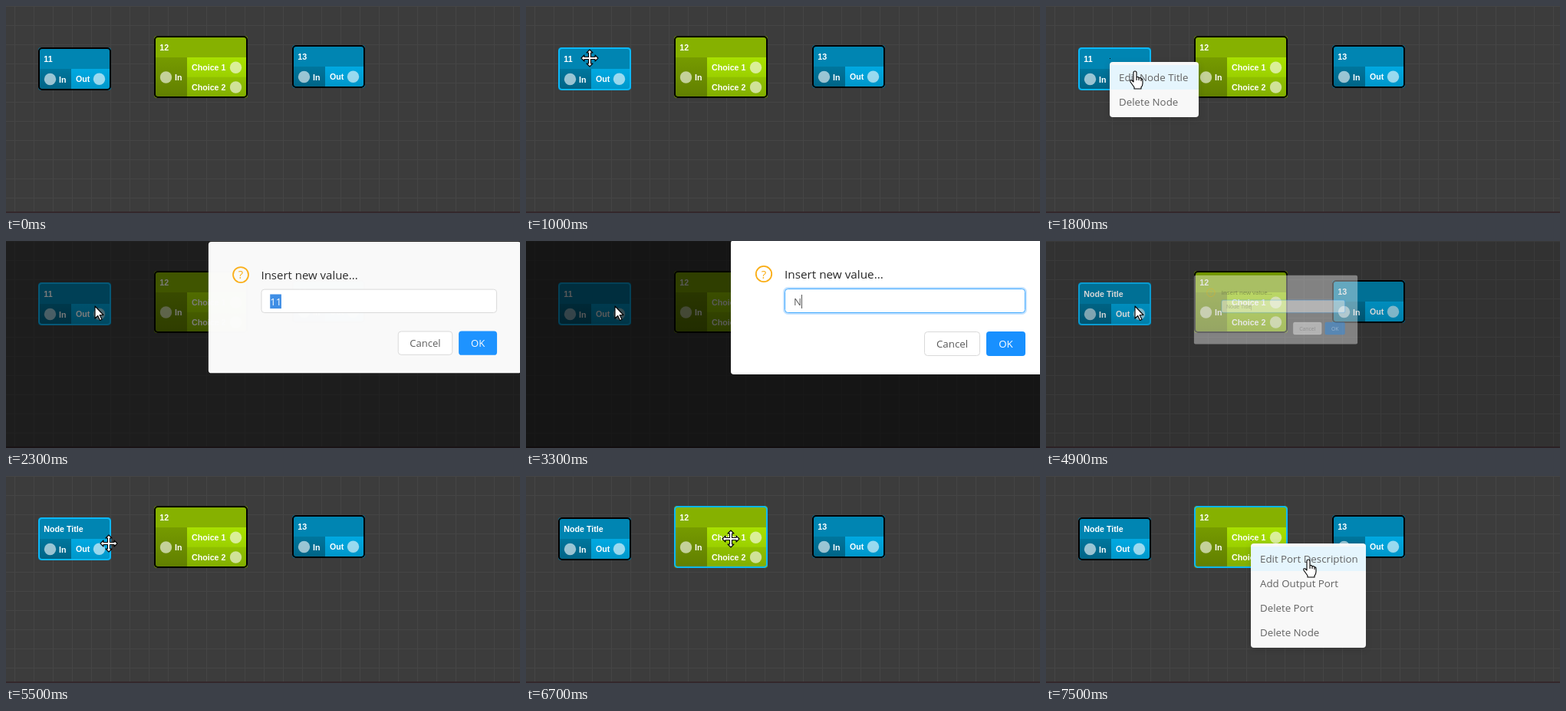
Animation of 670x270 px, one loop 8000 ms. Source, as an HTML page with a canvas:

```html
<!DOCTYPE html>
<html>
<head>
<meta charset="utf-8">
<style>
html, body { margin: 0; width: 100%; height: 100%; overflow: hidden; background: #3c3c3c; }
canvas { display: block; }
</style>
</head>
<body>
<canvas id="stage" width="670" height="270"></canvas>
<script>
const ctx = document.getElementById('stage').getContext('2d');
const LOOP = 8000, STEP = 100;
const NODE_FONT = 'bold 10.67px "Liberation Sans", Arial, sans-serif';
const uiFont = size => `${size}px "Open Sans", sans-serif`;

const BLUE = { head: '#0085b2', in: ['#00769d', '#006486'], out: [['#00a9e2', '#0097ca']] };
const GREEN = { head: '#86b100', in: ['#769b00', '#617f00'], out: [['#a8e000', '#9bd000'], ['#90c000', '#82ae00']] };

// Pointer path: time, x, y
const PATH = [
  [100, 298, 173], [300, 150, 115], [500, 46, 70], [700, 88, 69], [900, 88, 69], [1000, 83, 68],
  [1400, 83, 68], [1800, 116, 85], [5200, 116, 85], [5400, 120, 88], [5500, 134, 88],
  [5600, 165, 80], [5700, 215, 74], [5800, 263, 73], [5900, 263, 73], [6100, 259, 84],
  [6200, 259, 84], [6600, 267, 82], [7100, 267, 82], [7500, 342, 109], [LOOP, 342, 109]
];
const TYPED = [[3300, 1], [3500, 2], [3700, 3], [3800, 4], [3900, 5], [4200, 7], [4400, 8], [4500, 9], [4600, 10]];
const MENUS = [
  { start: 1300, end: 2200, x: 83, y: 73, w: 116, items: ['Edit Node Title', 'Delete Node'] },
  { start: 7100, end: LOOP, x: 267, y: 88, w: 150,
    items: ['Edit Port Description', 'Add Output Port', 'Delete Port', 'Delete Node'] }
];
const CURSORS = {
  arrow: new Path2D('M0 0V16L3.7 12.5L6.5 18.5L9 17.5L6.2 11.5H11Z'),
  move: new Path2D('M0-11L4-7H1.5V-1.5H7V-4L11 0L7 4V1.5H1.5V7H4L0 11L-4 7H-1.5V1.5H-7V4L-11 0L-7-4V-1.5H-1.5V-7H-4Z'),
  hand: new Path2D('M-2 14V2Q-2 0 0 0T2 2V8Q4 6.5 5 9Q7.5 8 8 10Q10 9.5 10 12V16Q10 19 8 21V23H-1V21L-6 14Q-7 11 -4 12ZM2 8V12M5 9V12M8 10V13')
};

const clamp = v => Math.max(0, Math.min(1, v));

function bezier(x1, y1, x2, y2, x) {
  const at = (a, b, u) => 3 * (1 - u) ** 2 * u * a + 3 * (1 - u) * u * u * b + u ** 3;
  let lo = 0, hi = 1;
  for (let i = 0; i < 24; i++) {
    const mid = (lo + hi) / 2;
    if (at(x1, x2, mid) < x) lo = mid; else hi = mid;
  }
  return at(y1, y2, hi);
}

function box(x, y, w, h, r, fill, stroke, line = 1) {
  ctx.beginPath();
  ctx.roundRect(x, y, w, h, r);
  if (fill) { ctx.fillStyle = fill; ctx.fill(); }
  if (stroke) { ctx.strokeStyle = stroke; ctx.lineWidth = line; ctx.stroke(); }
}

function label(str, x, y, font, color, align = 'left') {
  ctx.font = font;
  ctx.fillStyle = color;
  ctx.textAlign = align;
  ctx.fillText(str, x, y);
}

function disc(x, y) {
  ctx.beginPath();
  ctx.arc(x, y, 7.7, 0, 7);
  ctx.fillStyle = 'rgba(255,255,255,.6)';
  ctx.fill();
}

function shade(x, y, w, h, [from, to]) {
  const g = ctx.createLinearGradient(0, y, 0, y + h);
  g.addColorStop(0, from);
  g.addColorStop(1, to);
  ctx.fillStyle = g;
  ctx.fillRect(x, y, w, h);
}

function drawNode(node, selected) {
  const { x, y, w, h, title, ports, theme } = node;
  const top = y + 28, rows = h - 29.5;
  ctx.save();
  box(x, y, w, h, 4, theme.head);
  ctx.clip();
  shade(x, top, 43, rows, theme.in);
  ports.forEach((name, i) => {
    const rowY = top + i * 25.7;
    shade(x + 43, rowY, w - 43, 26, theme.out[i]);
    label(name, x + 49, rowY + 17.2, NODE_FONT, '#fff');
    disc(x + w - 15.5, rowY + 13.3);
  });
  ctx.restore();
  const mid = top + rows / 2;
  disc(x + 15.5, mid + .3);
  label('In', x + 27, mid + 4.4, NODE_FONT, '#fff');
  label(title, x + 7.3, y + 19, NODE_FONT, '#fff');
  box(x + 1, y + 1, w - 2, h - 2, 4, null, selected ? '#0cb8f8' : '#000', 2);
}

function drawMenu({ start, x, y, w, items }, t, px, py) {
  const p = bezier(.23, 1, .32, 1, clamp((t - start + 30) / 200));
  ctx.fillStyle = '#111';
  ctx.fillRect(x, y - 5, 1, 1);
  ctx.save();
  ctx.globalAlpha = p;
  ctx.translate(0, y);
  ctx.scale(1, .8 + .2 * p);
  ctx.shadowColor = 'rgba(0,0,0,.15)';
  ctx.shadowBlur = 8;
  ctx.shadowOffsetY = 2;
  box(x, 0, w, 8 + 32 * items.length, 4, '#f8f8f8');
  ctx.shadowColor = 'transparent';
  items.forEach((item, i) => {
    const rowY = 4 + 32 * i;
    if (px > x && py - y >= rowY && py - y < rowY + 32) {
      ctx.fillStyle = '#e5f5fd';
      ctx.fillRect(x, rowY, w, 32);
    }
    label(item, x + 12, rowY + 21, uiFont(13.3), '#626262');
  });
  ctx.restore();
}

function drawModal(t) {
  const closing = t >= 4750;
  const zoom = closing
    ? 1 - bezier(.78, .14, .15, .86, clamp((t - 4750) / 300))
    : bezier(.08, .82, .17, 1, clamp((t - 2125) / 300));
  const fade = closing ? 1 - clamp((t - 4750) / 200) : clamp((t - 2125) / 220);
  ctx.fillStyle = `rgba(0,0,0,${.65 * fade})`;
  ctx.fillRect(0, 0, 670, 270);

  const scale = .2 + .8 * zoom;
  ctx.save();
  ctx.globalAlpha = zoom;
  ctx.translate(115, 93);
  ctx.scale(scale, scale);
  ctx.translate(-115, -93);
  box(267, -1, 416, 175, 4, '#fff');

  ctx.beginPath();
  ctx.arc(310, 43, 10.2, 0, 7);
  ctx.strokeStyle = '#faad14';
  ctx.lineWidth = 1.8;
  ctx.stroke();
  label('?', 310, 48.5, uiFont(15), '#faad14', 'center');
  label('Insert new value...', 337, 49, uiFont(15.3), '#262626');

  const focused = t >= 2400;
  if (focused) box(336.5, 61.5, 315, 33, 5, null, 'rgba(24,144,255,.25)', 3);
  box(337.5, 62.5, 313, 31, 4, '#fff', focused ? '#40a9ff' : '#d9d9d9');
  const keys = TYPED.filter(k => k[0] <= t).pop();
  if (keys) {
    const text = 'Node Title'.slice(0, keys[1]);
    label(text, 349, 83.5, uiFont(13.3), '#595959');
    ctx.fillRect(349 + Math.round(ctx.measureText(text).width), 70, 1, 18);
  } else {
    ctx.fillStyle = '#3a8be5';
    ctx.fillRect(349, 69, 15, 19);
    label('11', 349, 83.5, uiFont(13.3), '#fff');
  }

  box(519.5, 118.5, 72, 31, 4, '#fff', '#d9d9d9');
  label('Cancel', 555.5, 139, uiFont(13.3), '#595959', 'center');
  box(600, 118, 51, 32, 4, '#1890ff');
  label('OK', 625.5, 139, uiFont(13.3), '#fff', 'center');
  ctx.restore();
}

function pointerAt(t) {
  const i = PATH.findIndex(p => p[0] > t);
  const [t0, x0, y0] = PATH[i - 1], [t1, x1, y1] = PATH[i];
  const k = (t - t0) / (t1 - t0);
  return [x0 + (x1 - x0) * k, y0 + (y1 - y0) * k];
}

function drawCursor(kind, x, y) {
  ctx.save();
  ctx.translate(x, y);
  ctx.lineJoin = 'round';
  ctx.fillStyle = '#fff';
  ctx.strokeStyle = '#000';
  ctx.lineWidth = 1.1;
  ctx.fill(CURSORS[kind]);
  ctx.stroke(CURSORS[kind]);
  ctx.restore();
}

function draw(t) {
  ctx.fillStyle = '#3c3c3c';
  ctx.fillRect(0, 0, 670, 270);
  ctx.fillStyle = '#454545';
  for (let x = 11; x < 670; x += 25) ctx.fillRect(x, 0, 1, 270);
  for (let y = 0; y < 270; y += 25) ctx.fillRect(0, y, 670, 1);
  ctx.fillStyle = '#34282c';
  ctx.fillRect(0, 268, 670, 2);

  const nodes = [
    { x: 42, y: 54, w: 95, h: 56, title: t < 4750 ? '11' : 'Node Title', ports: ['Out'], theme: BLUE },
    { x: 193, y: 39, w: 122, h: 81, title: '12', ports: ['Choice 1', 'Choice 2'], theme: GREEN },
    { x: 373, y: 51, w: 95, h: 56, title: '13', ports: ['Out'], theme: BLUE }
  ];
  const selected = t < 600 ? -1 : t < 6700 ? 0 : 1;
  nodes.forEach((node, i) => drawNode(node, i === selected));

  const modal = t >= 2200 && t < 5000;
  if (modal) drawModal(t);
  if (t < 100) return;

  const [px, py] = pointerAt(t);
  const inside = (r, h) => px >= r.x && px <= r.x + r.w && py >= r.y && py <= r.y + h;
  const menu = MENUS.find(m => t >= m.start && t < m.end);
  if (menu) drawMenu(menu, t, px, py);
  let kind = 'arrow';
  if (menu && inside(menu, 8 + 32 * menu.items.length)) kind = 'hand';
  else if (!modal && nodes.some(n => inside(n, n.h))) kind = 'move';
  drawCursor(kind, px, py);
}

function tick() {
  draw(Math.floor(performance.now() % LOOP / STEP) * STEP);
  requestAnimationFrame(tick);
}
tick();
</script>
</body>
</html>
```
